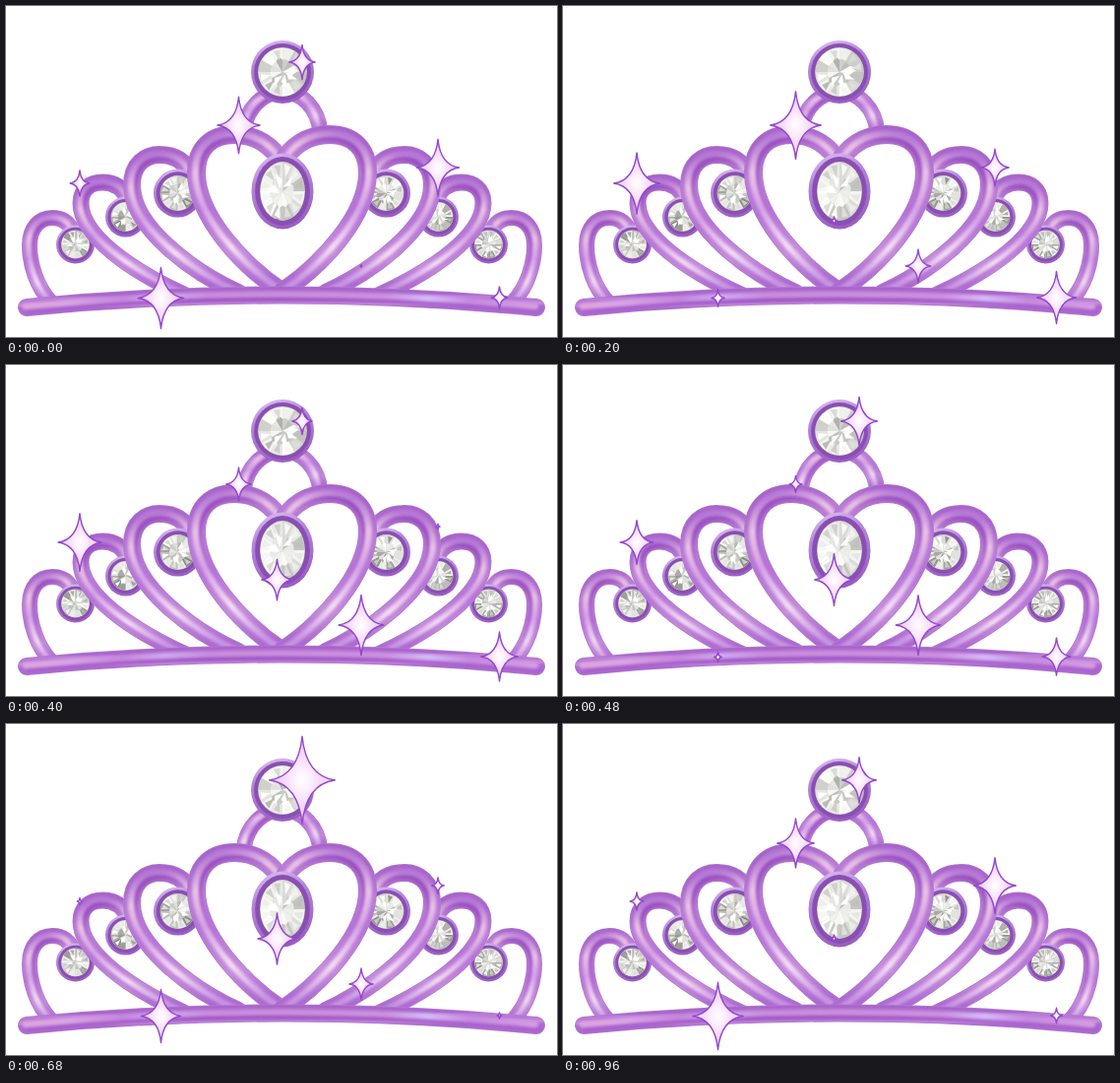
Recreate the animation shown at these times as an HTML page. Size 560 by 336 pixels, loop 1000 ms.

```html
<!DOCTYPE html>
<html lang="en">
<head>
<meta charset="utf-8">
<title>Sparkling tiara</title>
<style>
  html, body { margin: 0; width: 100%; height: 100%; overflow: hidden; background: #fff; }
  svg { display: block; width: 560px; height: 336px; }
  .tube { fill: none; stroke-linecap: round; stroke-linejoin: round; }
  .star { fill: url(#glow); stroke: #9248cc; stroke-width: 1.4; stroke-linejoin: round; }
</style>
</head>
<body>
<svg viewBox="0 0 560 336">
  <defs>
    <linearGradient id="body" x1=".3" y1="0" x2=".5" y2="1">
      <stop offset="0" stop-color="#a863ca"/>
      <stop offset=".2" stop-color="#b97dd6"/>
      <stop offset=".45" stop-color="#b574d6"/>
      <stop offset=".75" stop-color="#c58cda"/>
      <stop offset="1" stop-color="#ad69d0"/>
    </linearGradient>
    <linearGradient id="shine" x1=".3" y1="0" x2=".5" y2="1">
      <stop offset="0" stop-color="#b679d6"/>
      <stop offset=".18" stop-color="#eac2e6"/>
      <stop offset=".42" stop-color="#d6a2e6"/>
      <stop offset=".72" stop-color="#f4dcf4"/>
      <stop offset="1" stop-color="#c793e2"/>
    </linearGradient>
    <linearGradient id="shade" x1=".3" y1="0" x2=".5" y2="1">
      <stop offset="0" stop-color="#994fbe"/>
      <stop offset=".3" stop-color="#a258c8"/>
      <stop offset="1" stop-color="#a65fcc"/>
    </linearGradient>
    <linearGradient id="barShine" gradientUnits="userSpaceOnUse" x1="12" y1="0" x2="548" y2="0">
      <stop offset="0" stop-color="#e0a4dc"/>
      <stop offset=".1" stop-color="#d9a4e4"/>
      <stop offset=".2" stop-color="#c486dc"/>
      <stop offset=".28" stop-color="#cdaaf0"/>
      <stop offset=".36" stop-color="#c98cdc"/>
      <stop offset=".7" stop-color="#cc90df"/>
      <stop offset=".78" stop-color="#d6bcf8"/>
      <stop offset=".86" stop-color="#c68adf"/>
      <stop offset="1" stop-color="#d9a0e2"/>
    </linearGradient>
    <linearGradient id="rim" x1=".3" y1="0" x2=".6" y2="1">
      <stop offset="0" stop-color="#d9b8f0"/>
      <stop offset=".3" stop-color="#b485da"/>
      <stop offset="1" stop-color="#9a5cc2"/>
    </linearGradient>
    <radialGradient id="glow">
      <stop offset="0" stop-color="#fff"/>
      <stop offset=".15" stop-color="#fff6ff"/>
      <stop offset=".55" stop-color="#f4daFb"/>
      <stop offset="1" stop-color="#e9c4f6"/>
    </radialGradient>
    <filter id="soft" filterUnits="userSpaceOnUse" x="0" y="0" width="560" height="336">
      <feGaussianBlur stdDeviation="1.5"/>
    </filter>
  </defs>
  <g id="tiara"></g>
  <g id="stars"></g>
</svg>
<script>
const NS = 'http://www.w3.org/2000/svg';
const tiara = document.getElementById('tiara');
const TAU = Math.PI * 2;

function add(parent, tag, attrs) {
  const el = document.createElementNS(NS, tag);
  for (const k in attrs) el.setAttribute(k, attrs[k]);
  parent.appendChild(el);
  return el;
}

function random(seed) {
  return () => (seed = (seed * 16807) % 2147483647) / 2147483647;
}

// Rounded metal: a base stroke with a soft dark streak and a soft light one.
function tube(parent, d, w, shine = 'url(#shine)') {
  const line = (stroke, width, extra) =>
    add(parent, 'path', { class: 'tube', d, stroke, 'stroke-width': width, ...extra });
  line('#b07ad0', w);
  line('url(#body)', w - 1.6);
  line('url(#shade)', w * 0.3, { filter: 'url(#soft)', transform: 'translate(2.4 3)' });
  line(shine, w * 0.36, { filter: 'url(#soft)', transform: 'translate(-1 -1)' });
}

// Brilliant cut: a pale table in the middle, facets fanning out to the rim.
function gem(x, y, R, rx, ry, seed, dark = 115) {
  const ring = R - rx;
  const ell = (grow, fill) => add(tiara, 'ellipse', { cx: x, cy: y, rx: rx + grow, ry: ry + grow, fill });
  ell(ring, 'url(#rim)');
  ell(ring * 0.6, '#8a4fb2');
  ell(0.4, '#c9c9c4');
  const rnd = random(seed);
  const at = (a, r) => `${(x + rx * r * Math.cos(a)).toFixed(1)},${(y + ry * r * Math.sin(a)).toFixed(1)}`;
  const grey = lo => {
    const v = Math.round(lo + (255 - lo) * Math.sqrt(rnd()));
    return `rgb(${v},${v},${v - 4})`;
  };
  const poly = (points, fill) => add(tiara, 'polygon', { points: points.join(' '), fill });
  const n = 12, step = TAU / n;
  for (let i = 0; i < n; i++) {
    const a = i * step, r = 0.45 + rnd() * 0.25;
    poly([at(a, 1), at(a + step / 2, 1), at(a + step, 1), at(a + step, 0.5), at(a + step / 2, r), at(a, 0.5)], grey(dark));
    poly([at(a, 0.5), at(a + step / 2, r), at(a + step, 0.5), `${x},${y}`], grey(dark + 15));
    poly([at(a + step * 0.2, 0.95), at(a + step * 0.8, 0.9), at(a + step / 2, 0.5)], grey(dark + 20));
  }
  for (let i = 0; i < 4; i++) {
    const a = rnd() * TAU;
    poly([at(a, 0.15), at(a + 0.5, 0.7), at(a + 0.95, 0.4)], '#fff');
  }
}

// Draws a tube and its reflection in the centre line.
function pair(d, w) {
  tube(tiara, d, w);
  tube(add(tiara, 'g', { transform: 'translate(561 0) scale(-1 1)' }), d, w);
}

function gemPair(x, y, R, r, seed) {
  gem(x, y, R, r, r, seed);
  gem(561 - x, y, R, r, r, seed + 40);
}

pair('M46,301 C31,285 24,262 24,243 C24,225 34,215 47,215 C57,215 63,219 67,227', 16);
gemPair(70.5, 242, 19.5, 14, 311);
pair('M183,294 C125,268 76,232 76,200 C76,186 86,179 98,179 C110,179 119,185 124,196', 17);
gemPair(121.5, 214, 20.5, 14.5, 523);
pair('M236,291 C190,270 128,225 128,182 C128,160 142,151 156,151 C172,151 182,158 187,170', 18);
gemPair(174.5, 190, 24.5, 17.5, 877);

tube(tiara, 'M241.5,128 C244,103 262,87 281,87 C300,87 317,103 319.5,128', 16);
gem(281, 67, 32, 24.5, 24.5, 1409);

pair('M280.5,290 C240,263 193.5,213 193.5,169 C193.5,143 210,130.5 232,130.5 C255,130.5 272,143 281,160', 19);
gem(281, 188, 31.5, 22.5, 29.5, 2203, 165);

tube(tiara, 'M21,306 Q280,281 539,306', 18, 'url(#barShine)');

// x, y, half height at its largest, time of the peak in ms
const sparkles = [
  [301, 57, 45, 715],
  [236.5, 121, 35.5, 143],
  [75, 180, 33.5, 285],
  [439, 164, 28.8, 0],
  [361, 264, 31, 435],
  [275.5, 218, 29, 577],
  [157.5, 296.5, 37.8, 860],
  [501.5, 296, 28.5, 285]
].map(([x, y, max, peak]) => ({
  max, peak,
  el: add(document.getElementById('stars'), 'path', { class: 'star', transform: `translate(${x} ${y})` })
}));

function starPath(h) {
  if (h < 1.2) return '';
  const w = h * 0.75, c = h * 0.09;
  return `M0,${-h}Q${c},${-c} ${w},0Q${c},${c} 0,${h}Q${-c},${c} ${-w},0Q${-c},${-c} 0,${-h}Z`;
}

function draw() {
  const t = Math.floor((performance.now() % 1000) / 40) * 40;
  for (const s of sparkles) {
    const h = s.max * (1 + Math.cos(TAU * (t - s.peak) / 1000)) / 2;
    s.el.setAttribute('d', starPath(h));
  }
  requestAnimationFrame(draw);
}
draw();
</script>
</body>
</html>
```
